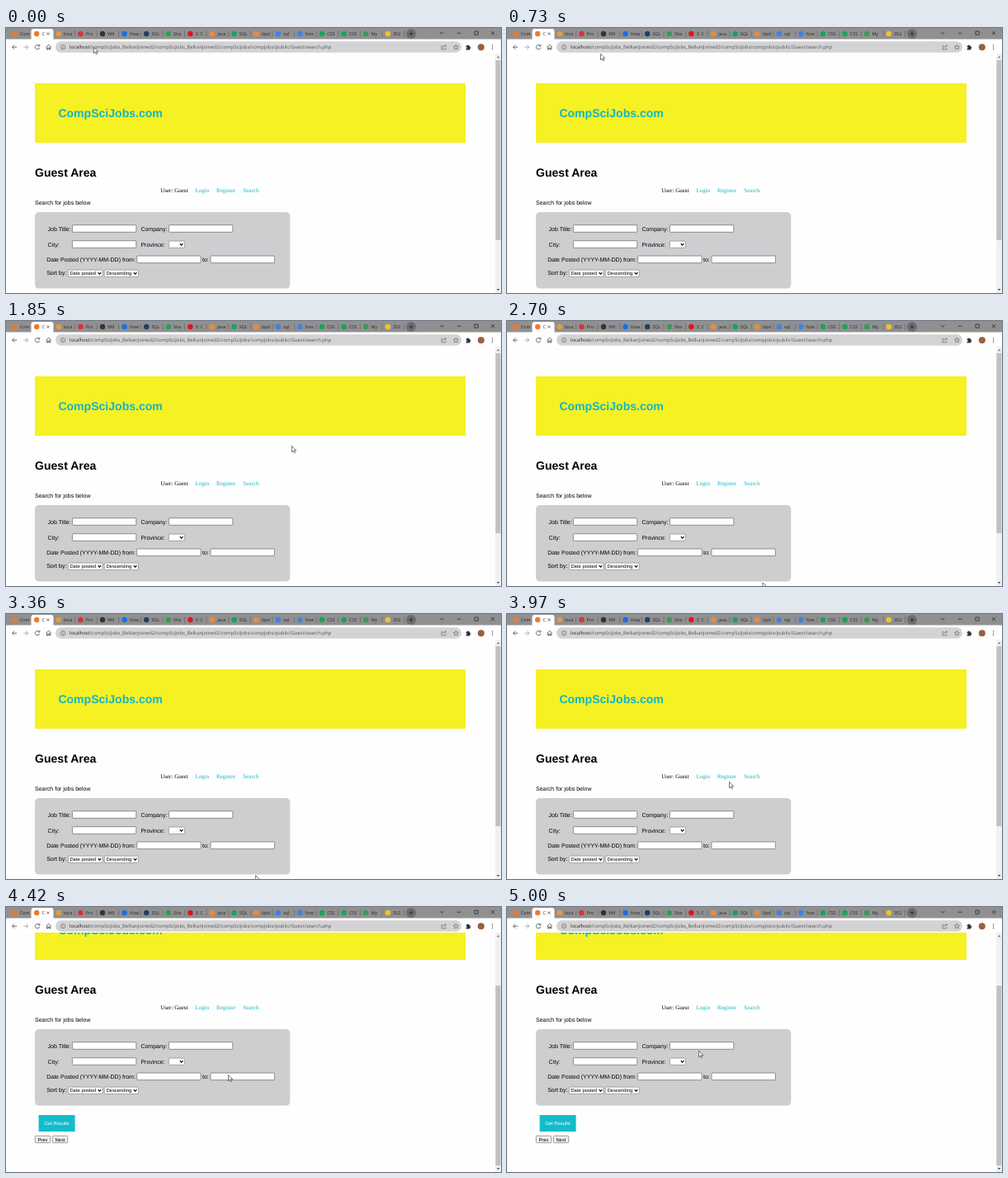
An HTML page for the animation above (5.03 s loop, 600 by 321 pixels).

```html
<!DOCTYPE html>
<html lang="en">
<head>
<meta charset="utf-8">
<title>Job search</title>
<style>
  html, body { margin: 0; width: 100%; height: 100%; overflow: hidden; background: #fefefe; }
  svg { display: block; width: 600px; height: 321px; }
  text { white-space: pre; text-rendering: geometricPrecision; }
  .sans { font-family: "Liberation Sans", Arial, sans-serif; }
  .serif { font-family: "Liberation Serif", "Times New Roman", serif; }
  .ui { font-family: "Open Sans", "Noto Sans", sans-serif; }
</style>
</head>
<body>
<svg id="stage" viewBox="0 0 600 321"></svg>
<script>
const LOOP = 5030;
const TEAL = '#12b5c8';
const BODY = 7.03, HEADING = 14.06, CONTROL = 5.86;
const stage = document.getElementById('stage');

function add(parent, tag, attrs = {}, content) {
  const el = document.createElementNS('http://www.w3.org/2000/svg', tag);
  for (const key in attrs) el.setAttribute(key, attrs[key]);
  if (content !== undefined) el.textContent = content;
  parent.appendChild(el);
  return el;
}
const box = (parent, x, y, width, height, fill, extra) =>
  add(parent, 'rect', { x, y, width, height, fill, ...extra });
const dot = (parent, cx, cy, r, fill) => add(parent, 'circle', { cx, cy, r, fill });
const line = (parent, d, stroke, width = 0.8) =>
  add(parent, 'path', { d, fill: 'none', stroke, 'stroke-width': width });
const label = (parent, x, y, text, size = BODY, fill = '#000', cls = 'sans', weight = 400) =>
  add(parent, 'text', { x, y, 'font-size': size, fill, class: cls, 'font-weight': weight }, text);

// Page content
const page = add(stage, 'g');
box(page, 35, 67, 522, 72, '#f5f123');
label(page, 63.4, 107.8, 'CompSciJobs.com', HEADING, TEAL, 'sans', 700);
label(page, 35, 180.4, 'Guest Area', HEADING, '#000', 'sans', 700);
label(page, 187.2, 199.4, 'User: Guest', BODY, '#000', 'serif');
[[229.4, 'Login'], [255, 'Register'], [287.3, 'Search']]
  .forEach(([x, text]) => label(page, x, 199.4, text, BODY, TEAL, 'serif'));
label(page, 35, 214.2, 'Search for jobs below');

function field(x, y) {
  box(page, x + 0.4, y + 0.4, 77.4, 8.6, '#fff', { stroke: '#767676', 'stroke-width': 0.8, rx: 0.6 });
}
function select(x, y, width, text) {
  box(page, x + 0.3, y + 0.3, width, 8.2, '#fff', { stroke: '#767676', 'stroke-width': 0.6, rx: 1 });
  label(page, x + 2.4, y + 6.5, text, CONTROL);
  const ax = x + width - 5.2;
  line(page, `M${ax} ${y + 3.4}l1.8 1.9l1.8 -1.9`, '#000', 1.2);
}
function button(x, text) {
  box(page, x + 0.3, 352.2, 18.4, 8.4, '#efefef', { stroke: '#767676', 'stroke-width': 0.7, rx: 1 });
  label(page, x + 3.4, 358.5, text, CONTROL);
}

box(page, 35, 223, 309.3, 92.6, '#cfcdd0', { rx: 5 });
label(page, 50.6, 245.6, 'Job Title:');
field(80, 238.3);
label(page, 163.4, 245.6, 'Company:');
field(197, 238.3);
label(page, 50.6, 264.5, 'City:');
field(80, 257.3);
label(page, 163.4, 264.5, 'Province:');
select(197, 257.8, 19, '');
label(page, 49.2, 282.8, 'Date Posted (YYYY-MM-DD) from:');
field(158.3, 275.6);
label(page, 238, 282.8, 'to:');
field(247.6, 275.6);
label(page, 49.2, 299.3, 'Sort by:');
select(75, 292.8, 41.8, 'Date posted');
select(119, 292.8, 41, 'Descending');
box(page, 39.6, 327, 44, 20, '#13bccb');
label(page, 46.2, 339.2, 'Get Results', CONTROL, '#fff');
button(35, 'Prev');
button(56, 'Next');

// Scrollbar
box(stage, 593, 31, 7, 290, '#f1f1f1');
const thumb = box(stage, 593.4, 39, 6, 218, '#c1c1c1');
add(stage, 'path', { d: 'M594.8 36.3h3.6l-1.8 -2.2z', fill: '#777' });
add(stage, 'path', { d: 'M594.8 316h3.6l-1.8 2.2z', fill: '#505050' });

// Tab strip
box(stage, 0, 0, 600, 14, '#919090');
const ORANGE = '#f0782c', GREEN = '#12a65a', BLUE = '#3b82e8';
const tabs = [
  ['Com', ORANGE], ['C', ORANGE], ['loca', '#e89a3c'], ['Pro', '#d8323c'], ['W9', '#333'],
  ['How', '#1570e8'], ['SQL', '#223e62'], ['Sha', '#2f9e58'], ['3: C', '#e3121b'], ['java', '#ee8a3a'],
  ['SQL', GREEN], ['Upd', '#ee8a3a'], ['sql', BLUE], ['fore', BLUE], ['CSS', GREEN],
  ['CSS', GREEN], ['My', '#2f9e58'], ['352', '#f4c22c']
];
const PITCH = 26.6;
box(stage, 30.5, 1, 27, 15, '#fff', { rx: 3 });
tabs.forEach(([text, color], i) => {
  const x = 10.6 + i * PITCH;
  dot(stage, x, 7, 3.2, color);
  label(stage, x + 6.2, 9.2, text, 5.4, '#252525', 'ui');
  if (i > 1) line(stage, `M${x + 19.8} 3.5v7`, '#555', 0.5);
});
line(stage, 'M49.3 5.4l3.2 3.2m0 -3.2l-3.2 3.2', '#444', 0.7);
dot(stage, 491, 7, 6, '#6f6e6e');
line(stage, 'M488.5 7h5m-2.5 -2.5v5', '#222');
line(stage, 'M526 5l2.2 2.2l2.2 -2.2M546.8 6.2h4.6M568 4h4.2v4.2h-4.2zM587.8 4l4.4 4.4m0 -4.4l-4.4 4.4', '#1b1b1b', 0.7);

// Toolbar
box(stage, 0, 13.5, 600, 17.5, '#fff');
box(stage, 60, 16.3, 492, 13.4, '#d3d2d4', { rx: 6.7 });
line(stage, 'M13 23.2h-5.4m2.6 -2.6l-2.6 2.6l2.6 2.6', '#444');
line(stage, 'M21.4 23.2h5.4m-2.6 -2.6l2.6 2.6l-2.6 2.6', '#999');
line(stage, 'M40.3 21.6a2.7 2.7 0 1 0 0.4 2.3M40.8 20v2h-2', '#444');
line(stage, 'M48.7 23l3 -2.7l3 2.7M49.6 22.6v3.4h1.4v-2h1.4v2h1.4v-3.4', '#444');
line(stage, 'M66.4 23.2a2.7 2.7 0 1 1 5.4 0a2.7 2.7 0 1 1 -5.4 0M69.1 22.7v2M69.1 21.5v0.6', '#555', 0.6);
const url = label(stage, 77, 25.3, '', 5.9, '#555', 'ui');
add(url, 'tspan', { fill: '#222' }, 'localhost');
add(url, 'tspan', {}, '/compSciJobs_BelkanJoined2/compSciJobs_BelkanJoined2/compSciJobs/compJobs/public/Guest/search.php');
line(stage, 'M529.5 21.5h-1.5v4.4h5v-1.6M529.8 24c0 -1.8 1.4 -2.4 3.6 -2.4m-1.4 -1.4l1.5 1.4l-1.5 1.4', '#555', 0.6);
line(stage, 'M545.4 20.2l0.9 2l2.1 0.2l-1.6 1.4l0.5 2.1l-1.9 -1.1l-1.9 1.1l0.5 -2.1l-1.6 -1.4l2.1 -0.2z', '#555', 0.6);
add(stage, 'path', { d: 'M557.6 21.4h1.3a1 1 0 0 1 2 0h1.4v1.5a1 1 0 0 1 0 2v1.5h-4.7v-1.5a1 1 0 0 0 0 -2z', fill: '#333' });
dot(stage, 575.8, 23.2, 4, '#9a5f3c');
[20.9, 23.2, 25.5].forEach(y => dot(stage, 589.6, y, 0.65, '#444'));

const cursor = add(stage, 'path', {
  d: 'M0 0V7.4L1.75 5.8L2.9 8.4L4.1 7.9L3 5.35H5.3Z',
  fill: '#fff', stroke: '#222', 'stroke-width': 0.6, 'stroke-linejoin': 'round'
});

// Rows of time, then values
const cursorSteps = [
  [0, 106.5, 23.3], [400, 108, 25], [730, 113.5, 31.3], [950, 128, 46], [1500, 325, 135],
  [1850, 346.5, 151.3], [2050, 347, 165], [2450, 326, 295], [2700, 310, 317],
  [3000, 308, 322], [3450, 302, 316], [3850, 269.5, 203.3], [4420, 269.5, 203.3],
  [4850, 232.5, 174.3], [LOOP, 232.5, 174.3]
];
const scrollSteps = [[0, 0], [3980, 0], [4167, 75], [LOOP, 75]];

function sample(steps, time) {
  const i = Math.max(1, steps.findIndex(step => step[0] >= time));
  const from = steps[i - 1], to = steps[i];
  const p = (time - from[0]) / (to[0] - from[0]);
  const eased = p * p * (3 - 2 * p);
  return from.slice(1).map((v, k) => v + (to[k + 1] - v) * eased);
}

const start = performance.now();
function draw(now) {
  const time = Math.max(0, now - start) % LOOP;
  const [scroll] = sample(scrollSteps, time);
  const [x, y] = sample(cursorSteps, time);
  page.setAttribute('transform', `translate(0 ${-Math.round(scroll)})`);
  thumb.setAttribute('y', 39 + scroll * 0.75);
  cursor.setAttribute('transform', `translate(${x} ${y})`);
  requestAnimationFrame(draw);
}
draw(start);
</script>
</body>
</html>
```
